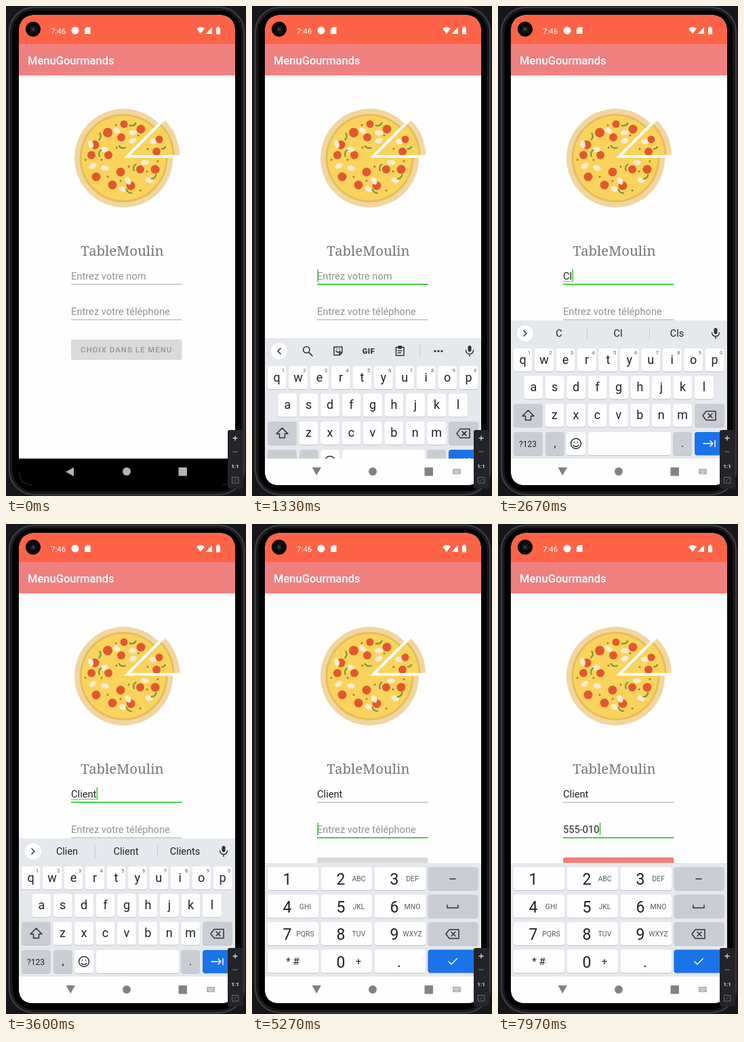
These frames come from a looping animation (354x720 px, 8 s). An HTML page:

```html
<!DOCTYPE html>
<html lang="fr">
<head>
<meta charset="utf-8">
<title>Commande</title>
<style>
html, body { margin: 0; width: 100%; height: 100%; overflow: hidden; background: #17171b; }
svg { display: block; width: 100%; height: 100%; font-family: Roboto, sans-serif; }
.mid { text-anchor: middle; }
.line { fill: none; stroke: #303135; stroke-width: 1.5; stroke-linecap: round; stroke-linejoin: round; }
.white { stroke: #fff; }
</style>
</head>
<body>
<svg id="stage" viewBox="0 0 354 720">
  <defs>
    <clipPath id="screen"><path d="M19 39Q19 13 45 13H312Q338 13 338 39V682Q338 704 316 704H41Q19 704 19 682Z"/></clipPath>
    <clipPath id="wedge"><path d="M174 223H260L234 163Z"/></clipPath>
  </defs>
  <rect width="354" height="720" fill="#17171b"/>
  <rect x="5" y="2" width="346" height="716" rx="36" fill="#000" stroke="#3c3c42" stroke-width="2.500"/>
  <rect x="8" y="5" width="340" height="710" rx="33" fill="none" stroke="#1b1b1f" stroke-width="3"/>
  <g clip-path="url(#screen)">
    <rect x="19" y="13" width="319" height="691" fill="#fefefe"/>
    <rect x="19" y="13" width="319" height="44" fill="#ff6347"/>
    <rect x="19" y="56" width="319" height="46" fill="#f08080"/>
    <g fill="#fff">
      <text x="66" y="40.500" font-size="11.5">7:46</text>
      <circle cx="102" cy="36" r="5.500"/>
      <path d="M119 31h5.500v10h-8.500v-7z"/>
      <path d="M281 33Q287 29 293 33L287 41Z"/>
      <path d="M304 31V41H294.500Z"/>
      <path d="M310 32h1.500v-1.500h3V32H316v9.500h-6z"/>
      <text x="32" y="86" font-size="16.5" font-weight="500">MenuGourmands</text>
    </g>
    <g id="pizza"></g>
    <text class="mid" x="171.500" y="367" font-size="20.3" fill="#757575" style="font-family:'Noto Serif',serif">TableMoulin</text>
    <g id="fields"></g>
    <rect id="button" x="96" y="490" width="163.500" height="30" rx="3"/>
    <text id="buttonText" x="110" y="509.300" font-size="11.4" font-weight="500" letter-spacing="1.02">CHOIX DANS LE MENU</text>
    <g id="darkNav" fill="#b4b4b4">
      <rect x="19" y="665" width="319" height="39" fill="#000"/>
      <path d="M88 684.500L100 678V691Z"/>
      <circle cx="178" cy="684" r="6"/><rect x="254.500" y="678" width="12.500" height="12.500" rx="1"/>
    </g>
    <g id="letters"></g>
    <g id="digits"></g>
    <g id="lightNav" fill="#828282">
      <rect x="19" y="665" width="319" height="39" fill="#fefefe"/>
      <path d="M88.500 678H102L95.200 690Z"/>
      <circle cx="178" cy="684" r="6"/><rect x="254.500" y="678" width="12.500" height="12.500" rx="1"/>
      <rect x="296" y="680" width="12" height="8" rx="1" fill="#b2b2b2"/>
      <path d="M298 682.500h8m-8 2h8m-6 2h4" stroke="#fefefe" stroke-dasharray="1.2 1"/>
    </g>
  </g>
  <circle cx="40" cy="34" r="11" fill="#030304"/>
  <circle cx="40" cy="34" r="6" fill="#131316"/><circle cx="40" cy="34" r="2.500" fill="#36363c"/>
  <rect x="327" y="623" width="23" height="86" rx="3" fill="#232429"/>
  <g fill="none" stroke="#d8d8dc" stroke-width="1.3">
    <path d="M334.500 635h7m-3.500-3.500v7"/>
    <path d="M334.500 655h7" stroke="#6c6c72"/>
    <path d="M333.500 692.500h9.500v8.500h-9.500zM336 698.500l4.500-4" stroke="#6c6c72" stroke-width="1"/>
  </g>
  <text class="mid" x="338" y="679" font-size="8" font-weight="700" fill="#e2e2e6">1:1</text>
</svg>
<script>
const LOOP = 8000;
const NAME_FOCUS = 930, KEYBOARD_IN = 1200, RISE = 250, PHONE_FOCUS = 4100;
const NAME = 'Client', NAME_KEYS = [2250, 2480, 2700, 2920, 3150, 3380];
const PHONE = '555-010', PHONE_KEYS = [5500, 5950, 6350, 6700, 7050, 7400, 7700];
const INK = '#202124', GREY = '#cacdd4', BLUE = '#1a73e8', BOARD = '#e5e8ed', GREEN = '#48d048';

const $ = id => document.getElementById(id);
const set = (el, attrs) => { for (const k in attrs) el.setAttribute(k, attrs[k]); };
const show = (el, on) => { el.style.display = on ? '' : 'none'; };
const label = (x, y, size, text, fill = INK, extra = '') =>
  `<text class="mid" x="${x}" y="${y}" font-size="${size}" fill="${fill}" ${extra}>${text}</text>`;
const line = (d, cls = '') => `<path class="line ${cls}" d="${d}"/>`;
const key = (x, y, w, fill = '#fefefe') =>
  `<rect x="${x}" y="${y + 1}" width="${w}" height="34" rx="4" fill="#bfc2c9"/>` +
  `<rect x="${x}" y="${y}" width="${w}" height="34" rx="4" fill="${fill}"/>`;
const backspace = (x, y) =>
  line(`M${x - 10} ${y}l5-6.500h14v13h-14zM${x - 2} ${y - 3}l6 6m0-6l-6 6`);

function drawPizza() {
  const at = (list, shape) => list.map(([x, y, v]) => shape(x, y, v)).join('');
  const salami = at([[150, 186, 7], [174, 173.5, 5.5], [199, 181, 6.5], [170, 193, 6], [131, 204, 6.5],
    [126, 219, 6], [151, 219, 6], [169, 244, 6.5], [133, 251, 6.5], [157, 263, 6.5], [184, 264, 6.5],
    [198, 240, 6], [220, 240, 6.5]], (x, y, r) => `<circle cx="${x}" cy="${y}" r="${r}" fill="#e2582e"/>`);
  const mushrooms = at([[163, 183, 30], [187, 198, -20], [145, 211, 0], [146, 238, 10], [128, 235, -30],
    [180, 257, 60], [211, 256, 20], [125, 203, 70], [205, 230, 0], [172, 269, 20], [187, 186, 0]],
    (x, y, a) => `<ellipse cx="${x}" cy="${y}" rx="6" ry="3.800" fill="#f8ecd2" transform="rotate(${a} ${x} ${y})"/>`);
  const peppers = at([[187, 174, 20], [138, 192, -40], [139, 216, 150], [171, 207, 60], [190, 237, 150],
    [181, 272, 80], [218, 251, 0]],
    (x, y, a) => `<path d="M-3.500 3Q2.500 2.500 3.500-3.500" fill="none" stroke="#6f9a3a" stroke-width="2.200" stroke-linecap="round" transform="translate(${x} ${y}) rotate(${a})"/>`);
  const olives = at([[162, 175], [117, 226], [141, 226], [181, 236], [150, 251], [169, 257], [208, 243],
    [198, 271], [163, 208], [195, 190], [224, 228]],
    (x, y) => `<circle cx="${x}" cy="${y}" r="1.500" fill="#a07c34"/>`);
  const base = `<circle cx="173.500" cy="223.500" r="72.500" fill="#f2d6a0"/>
    <circle cx="173.500" cy="223.500" r="65" fill="#e6bd5c"/><circle cx="173.500" cy="223.500" r="62" fill="#fad35c"/>`;
  $('pizza').innerHTML = base + salami + mushrooms + peppers + olives +
    `<path d="M174 223H260L234 163Z" fill="#fefefe"/>
    <g transform="translate(10 -4)"><g clip-path="url(#wedge)">${base}
      <ellipse cx="207" cy="203" rx="6" ry="4" fill="#f8ecd2"/>
      <circle cx="212" cy="218" r="6" fill="#e2582e"/><circle cx="216" cy="200" r="5.500" fill="#e2582e"/>
      <path d="M219 214q6 0 6-4" fill="none" stroke="#6f9a3a" stroke-width="2.200"/>
      <circle cx="199" cy="214" r="1.500" fill="#a07c34"/>
    </g></g>`;
}

function drawLetters() {
  let out = `<rect x="19" y="462" width="319" height="204" fill="${BOARD}"/>`;
  [['qwertyuiop', 36.6, 503], ['asdfghjkl', 52.3, 543.5], ['zxcvbnm', 83.5, 584.5]].forEach(([row, start, y], r) => {
    [...row].forEach((c, i) => {
      const x = start + i * 31.45;
      out += key(x - 14, y, 28) + label(x, y + 22.5, 18, c);
      if (!r) out += label(x + 9.5, y + 9, 8, (i + 1) % 10, '#5a5c62');
    });
  });
  out += key(23, 584.5, 43, GREY) + line('M44.500 594l8.500 8.500h-4.500v6h-8v-6h-4.500z');
  out += key(290, 584.5, 44, GREY) + backspace(312, 602);
  out += key(23, 626, 43, GREY) + label(44, 647.5, 12, '?123');
  out += key(70, 626, 28, GREY) + label(84, 648, 16, ',');
  out += key(101, 626, 28) + line('M122.500 643a7.500 7.500 0 1 1-15 0a7.500 7.500 0 1 1 15 0M111 645.500q4 4 8 0M112.500 640.500v.5m5-.5v.5');
  out += key(133, 626, 122) + key(258, 626, 28, GREY) + label(272, 648, 16, '.');
  out += key(290, 626, 48, BLUE) + line('M303 643h14m-4-4l4 4l-4 4m7-8.500v9', 'white');
  out += '<circle cx="40" cy="481" r="12" fill="#fefefe"/><path id="chevron" class="line"/>';
  out += '<rect x="318.500" y="473" width="5" height="9" rx="2.500" fill="#303135"/>' + line('M315.500 480a5.500 5.500 0 0 0 11 0M321 485.500v3');
  out += `<g id="tools">${line('M85 479a4.700 4.700 0 1 1-9.400 0a4.700 4.700 0 1 1 9.400 0M84 483l5 5')}
    ${line('M121 475h12v8l-4 4h-8zM129 487v-4h4M124 481q3 3.500 6 0M125 478v.3m4-.3v.3')}
    ${label(172, 484.500, 11, 'GIF', '#303135', 'font-weight="900" letter-spacing=".5"')}
    ${line('M212.500 475.500h11.500v12h-11.500zM216 474h4.500v3h-4.500zM215.500 480.500h5.500m-5.500 3h4')}
    <path d="M247.500 472v18" stroke="#c8cbd2"/>
    ${[270, 275, 280].map(x => `<circle cx="${x}" cy="481" r="1.700" fill="#303135"/>`).join('')}</g>`;
  out += `<g id="words"><path d="M131.500 472v18M223.500 472v18" stroke="#c8cbd2"/>
    ${[90, 177, 264].map(x => label(x, 486, 14.5, '')).join('')}</g>`;
  $('letters').innerHTML = out;
}

function drawDigits() {
  const subs = ['', 'ABC', 'DEF', 'GHI', 'JKL', 'MNO', 'PQRS', 'TUV', 'WXYZ'];
  const rows = [504, 544.5, 585, 625.5], cols = [22.5, 101.5, 180.5];
  let out = `<rect x="19" y="498" width="319" height="168" fill="${BOARD}"/>`;
  subs.forEach((sub, i) => {
    const x = cols[i % 3], y = rows[i / 3 | 0];
    out += key(x, y, 75.5) + label(x + 29.5, y + 26, 23, i + 1) + label(x + 56, y + 21, 10.5, sub, '#5a5c62');
  });
  const y = rows[3];
  out += key(cols[0], y, 75.5) + label(60, y + 22, 15, '* #');
  out += key(cols[1], y, 75.5) + label(131, y + 26, 23, 0) + label(157, y + 22, 15, '+');
  out += key(cols[2], y, 75.5) + label(217, y + 25, 22, '.');
  rows.forEach((top, i) => { out += key(259.5, top, i < 3 ? 74 : 79, i < 3 ? GREY : BLUE); });
  out += line('M292 521.500h8') + line('M288 560v4h16v-4') + backspace(296, 602.5) + line('M290 643l4 4l8.500-8.500', 'white');
  $('digits').innerHTML = out;
}

function makeField(y, hint) {
  const group = document.createElementNS('http://www.w3.org/2000/svg', 'g');
  group.innerHTML = `<text x="96" y="${y}" font-size="14.7"></text>
    <rect x="96" width="163.500"/><path stroke="${GREEN}" stroke-width="1.800"/><path stroke="#a4a4a4"/>`;
  $('fields').append(group);
  const [text, rule, caret, underline] = group.children;
  return (value, focused, blink, composing, pressed) => {
    text.textContent = value || hint;
    set(text, { fill: value ? INK : pressed ? '#5c5c5c' : '#929292' });
    set(rule, { y: focused ? y + 6 : y + 6.5, height: focused ? 2 : 1, fill: focused ? GREEN : '#a6a6a6' });
    const end = 96 + (value ? text.getComputedTextLength() : 0);
    set(caret, { d: `M${end + 1} ${y - 15}v18` });
    show(caret, focused && blink);
    set(underline, { d: `M96 ${y + 2.5}H${end}` });
    show(underline, composing);
  };
}

drawPizza();
drawLetters();
drawDigits();
const nameField = makeField(402, 'Entrez votre nom');
const phoneField = makeField(454, 'Entrez votre téléphone');
const wordLabels = $('words').querySelectorAll('text');
const events = [NAME_FOCUS, ...NAME_KEYS, PHONE_FOCUS, ...PHONE_KEYS];
const typed = (text, times, t) => text.slice(0, times.filter(k => k <= t).length);

function render(t) {
  const name = typed(NAME, NAME_KEYS, t), phone = typed(PHONE, PHONE_KEYS, t);
  const onPhone = t >= PHONE_FOCUS, onName = t >= NAME_FOCUS && !onPhone;
  const last = Math.max(0, ...events.filter(e => e <= t));
  const blink = (t - last) % 1000 < 500;
  nameField(name, onName, blink, onName && name, onName && t < NAME_FOCUS + 150);
  phoneField(phone, onPhone, blink);

  const ready = name && phone;
  set($('button'), { fill: ready ? '#f08080' : '#dadada' });
  set($('buttonText'), { fill: ready ? '#fff' : '#949494' });

  const raised = t >= KEYBOARD_IN;
  const p = Math.min(1, Math.max(0, (t - KEYBOARD_IN) / RISE));
  set($('letters'), { transform: `translate(0 ${242 * (1 - p) ** 3})` });
  show($('letters'), raised && !onPhone);
  show($('digits'), onPhone);
  show($('darkNav'), !raised);
  show($('lightNav'), raised);

  set($('chevron'), { d: name ? 'M38 477l4 4l-4 4' : 'M42 477l-4 4l4 4' });
  show($('tools'), !name);
  show($('words'), name);
  [name.slice(0, -1), name, name + 's'].forEach((w, i) => { wordLabels[i].textContent = w; });
}

const start = performance.now();
function tick() {
  render((performance.now() - start) % LOOP);
  requestAnimationFrame(tick);
}
tick();
</script>
</body>
</html>
```
